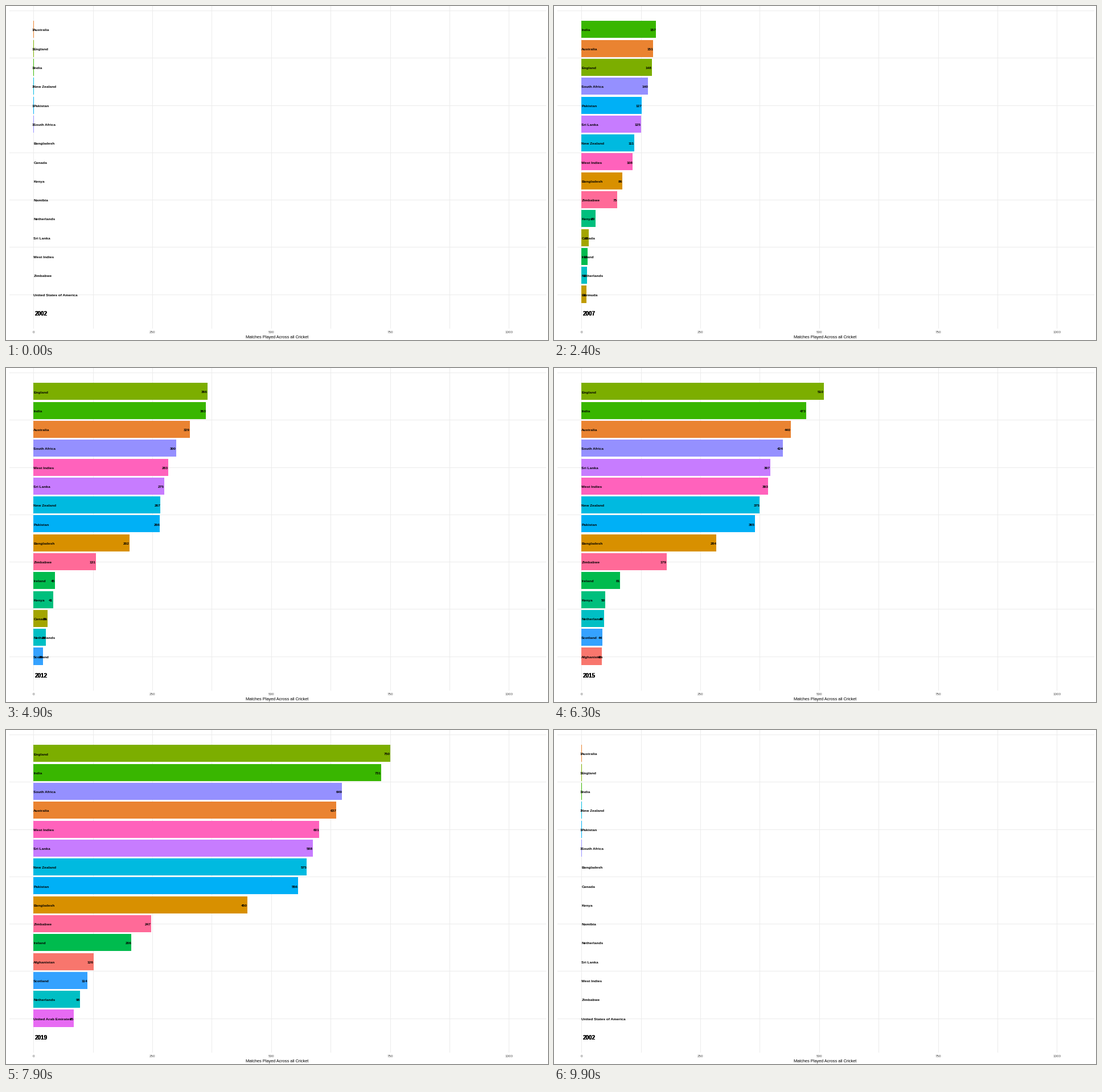
These frames come from a looping animation (952x588 px, 10000 ms). A matplotlib script:

```python
import matplotlib.pyplot as plt
import numpy as np
from matplotlib.animation import FuncAnimation
from matplotlib.patches import Rectangle

W, H, DPI = 952, 588, 64
PT = 72 / DPI                      # points per pixel
X0, X_SCALE = 48.3, 0.835          # pixel of zero, pixels per match
Y0, ROW, BAR = 8.0, 33.3, 30.0     # pixel of rank zero, row pitch, bar height
LEFT, RIGHT, TOP, BOTTOM = 5.5, 947.5, 0, 566.5
TOP_N, FIRST_YEAR = 15, 2002

# Cumulative matches at the anchor years; short rows keep their last value.
ANCHORS = [2003, 2005, 2007, 2012, 2015, 2019, 2022, 2023]
MATCHES = {
    "Australia": (25, 84, 151, 329, 440, 637, 798, 871),
    "England": (22, 78, 148, 366, 510, 750, 950, 1017),
    "India": (23, 80, 157, 363, 473, 731, 934, 1026),
    "New Zealand": (18, 59, 111, 267, 375, 575, 743, 828),
    "Pakistan": (16, 66, 127, 266, 365, 556, 712, 780),
    "South Africa": (21, 72, 140, 300, 424, 649, 809, 877),
    "Bangladesh": (14, 44, 86, 202, 284, 450, 584, 659),
    "Canada": (6, 6, 15, 29, 34),
    "Kenya": (9, 11, 29, 41, 50, 62),
    "Namibia": (6,),
    "Netherlands": (6, 6, 12, 26, 47, 98, 164, 200),
    "Sri Lanka": (19, 67, 125, 275, 397, 588, 717, 783),
    "West Indies": (15, 58, 108, 283, 393, 601, 771, 833),
    "Zimbabwe": (14, 44, 75, 131, 179, 247, 349, 387),
    "United States of America": (0, 2),
    "Bermuda": (0, 0, 11, 14),
    "Ireland": (0, 0, 13, 45, 81, 206, 321, 381),
    "Scotland": (0, 0, 10, 20, 44, 114, 177, 207),
    "Afghanistan": (0, 0, 0, 17, 43, 126, 172, 203),
    "United Arab Emirates": (0, 0, 0, 4, 25, 85, 165, 215),
}
TEAMS = list(MATCHES)
PALETTE = ("F8766D EA8331 D89000 C09B00 A3A500 7CAE00 39B600 00BB4E 00BF7D 00C1A3 "
           "00BFC4 00BAE0 00B0F6 35A2FF 9590FF C77CFF E76BF3 FA62DB FF62BC FF6A98").split()
COLORS = {team: "#" + c for team, c in zip(sorted(TEAMS), PALETTE)}

# Each year holds from its start frame; the frame before a start is halfway.
STARTS = np.cumsum([0, 4] + [5] * 9 + [4, 5, 5] + [4] * 9)
PACE = {2018: 2017.83, 2020: 2019.54, 2021: 2020.56}   # uneven seasons


def standings(year):
    """Return {team: (rank, matches)} for the leading teams of a year."""
    if year == FIRST_YEAR:
        totals = {t: int(i < 6) for i, t in enumerate(TEAMS)}
    else:
        when = PACE.get(year, year)
        totals = {t: int(round(np.interp(when, ANCHORS[:len(v)], v)))
                  for t, v in MATCHES.items()}
    ranked = sorted(TEAMS, key=lambda t: -totals[t])[:TOP_N]
    return {t: (rank, totals[t]) for rank, t in enumerate(ranked, 1)}


YEARS = [FIRST_YEAR + k for k in range(len(STARTS) - 1)] + [FIRST_YEAR]
TABLES = [standings(year) for year in YEARS]

plt.rcParams["font.family"] = "Liberation Sans"
fig = plt.figure(figsize=(W / DPI, H / DPI), dpi=DPI, facecolor="white")
ax = fig.add_axes([0, 0, 1, 1])
ax.set(xlim=(0, W), ylim=(H, 0))
ax.axis("off")


def label(x, y, text, size, **kw):
    return ax.text(x, y, text, fontsize=size * PT, va="baseline", **kw)


grid = dict(color="#EBEBEB", lw=PT, antialiased=False, zorder=0)
ax.hlines([Y0 + ROW * 2.5 * k for k in range(7)], LEFT, RIGHT, **grid)
ax.vlines([X0 + X_SCALE * 125 * k for k in range(9)], TOP, BOTTOM, **grid)
for tick in range(0, 1001, 250):
    label(X0 + X_SCALE * tick, 576, str(tick), 6.3, ha="center", color="#4D4D4D")
label((LEFT + RIGHT) / 2, 585, "Matches Played Across all Cricket", 7.35, ha="center")

bars, names, counts = {}, {}, {}
for team in TEAMS:
    bars[team] = ax.add_patch(Rectangle((X0, 0), 0, BAR, fc=COLORS[team], lw=0, zorder=1))
    names[team] = label(X0, 0, team, 6.45, weight="bold", zorder=3)
    counts[team] = label(X0, 0, "", 6.45, weight="bold", ha="right", zorder=3)
# Stacked copies give the year its heavy edges.
year_texts = [label(50.2, 544.7, "", 9.9, weight="bold") for _ in range(3)]


def update(frame):
    k = int(np.searchsorted(STARTS, frame, side="right")) - 1
    moving = frame + 1 in STARTS
    old, new = TABLES[k], TABLES[k + moving]
    for team in TEAMS:
        shown = team in old and team in new
        names[team].set_visible(shown)
        counted = shown and old[team][1] > 0 and new[team][1] > 0
        bars[team].set_visible(counted)
        counts[team].set_visible(counted)
        if not shown:
            continue
        rank, matches = (np.array(old[team]) + new[team]) / 2
        y, width = Y0 + ROW * rank, X_SCALE * matches
        bars[team].set_y(y - BAR / 2)
        bars[team].set_width(width)
        names[team].set_y(y + 3.2)
        counts[team].set_position((X0 + width, y + 3.2))
        counts[team].set_text(str(new[team][1]))
    for text in year_texts:
        text.set_text(str(YEARS[k + moving]))
    return []


anim = FuncAnimation(fig, update, frames=100, interval=100, repeat=True,
                     repeat_delay=0, blit=False)
plt.show()
```
